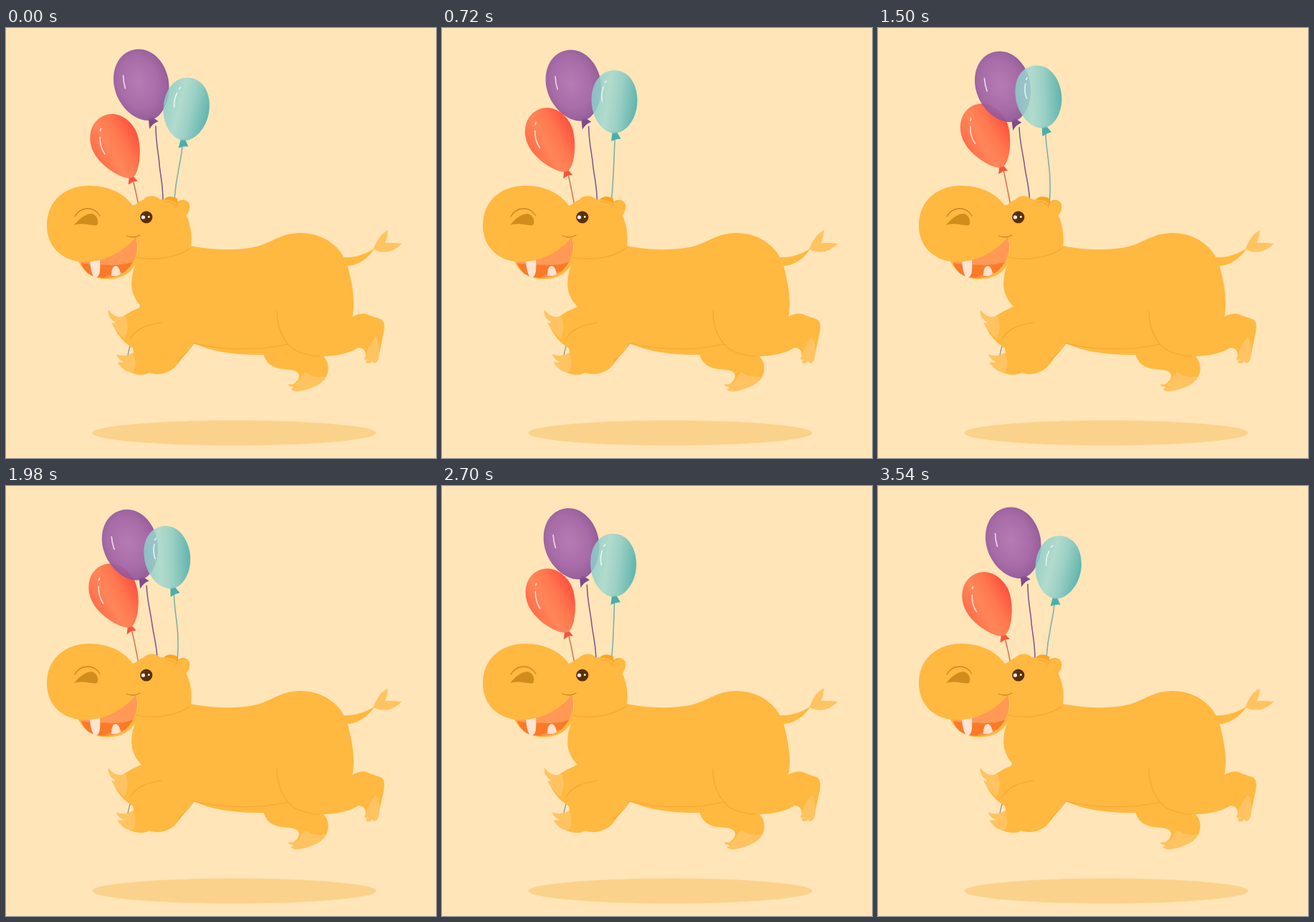
An HTML page that plays this animation: 600 px wide and 600 px high, repeating every 3.57 s.

```html
<!DOCTYPE html>
<html lang="en">
<head>
<meta charset="utf-8">
<title>Hippo with balloons</title>
<style>
  html, body { margin: 0; width: 100%; height: 100%; overflow: hidden; background: #ffe5b8; }
  svg { display: block; width: 100vw; height: 100vh; }
  .line { fill: none; stroke-linecap: round; stroke-linejoin: round; }
  .shade { stroke: #f5a630; stroke-width: 1.2; }
  .shine { stroke: #fff; stroke-opacity: .75; stroke-width: 1.6; }
  .body { fill: #ffb840; }
  .pale { fill: #ffc361; }
</style>
</head>
<body>
<svg viewBox="0 0 600 600">
  <defs>
    <radialGradient id="purple" cx=".46" cy=".46" r=".6">
      <stop offset="0" stop-color="#b071b3"/><stop offset=".6" stop-color="#a062a6"/><stop offset="1" stop-color="#864d92"/>
    </radialGradient>
    <linearGradient id="teal" x1="0" y1=".4" x2="1" y2=".6">
      <stop offset="0" stop-color="#87cdc9"/><stop offset=".35" stop-color="#a3d9d0"/>
      <stop offset=".6" stop-color="#8accc7"/><stop offset="1" stop-color="#41abab"/>
    </linearGradient>
    <linearGradient id="orange" x1="0" y1=".55" x2="1" y2=".45">
      <stop offset="0" stop-color="#ff6d4a"/><stop offset=".35" stop-color="#ff8659"/>
      <stop offset=".65" stop-color="#ff774f"/><stop offset="1" stop-color="#ff513f"/>
    </linearGradient>
    <clipPath id="mouth">
      <path d="M104 326C130 328 165 314 181 291C186 306 181 328 166 340C150 351 126 351 114 342Q107 335 104 326Z"/>
    </clipPath>
  </defs>

  <ellipse cx="318.500" cy="565" rx="198" ry="17.500" fill="#fbd28b"/>

  <path id="orangeString" class="line" stroke="#d8684a" stroke-width="1.400"/>
  <g id="orangeBalloon">
    <path fill="#f4573c" transform="rotate(8 0 46)" d="M-2 44H2L7 55Q0 53 -7 56Z"/>
    <path fill="url(#orange)" d="M0 -47C20 -47 33 -28 33 -8C33 14 13 48 1 48C-11 48 -33 16 -33 -8C-33 -28 -20 -47 0 -47Z"/>
    <path class="line shine" d="M-12 -30L-10 -32M-16 -22Q-22 -10 -20 2"/>
  </g>

  <g id="purpleBalloon">
    <path class="line" stroke="#7d5487" stroke-width="1.500" d="M209 137C209 160 213 176 214 190S219 218 219 240"/>
    <g transform="translate(189.500 79.500) rotate(-14)">
      <path fill="#804a8c" transform="rotate(-12 0 50)" d="M-2 48H4L9 57Q0 56 -7 61Z"/>
      <path fill="url(#purple)" fill-opacity=".92" d="M0 -50.500C23 -50.500 38 -28 38 -3C38 25 19 50.500 1 50.500C-18 50.500 -38 25 -38 -3C-38 -28 -23 -50.500 0 -50.500Z"/>
      <path class="line shine" d="M-22 -19Q-24 -10 -23.500 -1"/>
    </g>
  </g>

  <path id="tealString" class="line" stroke="#7cada2" stroke-width="1.500"/>
  <g id="tealBalloon">
    <path fill="#4caeac" transform="rotate(-10 0 44)" d="M-3 42H3L7 53Q0 52 -7 54Z"/>
    <path fill="url(#teal)" fill-opacity=".85" d="M0 -44C20 -44 32 -25 32 -2C32 23 16 44 0 44C-16 44 -32 23 -32 -2C-32 -25 -20 -44 0 -44Z"/>
    <path class="line shine" d="M-11 -29L-13 -27M-15 -21Q-19 -11 -17 -1"/>
  </g>

  <path id="gapString" class="line" stroke="#7cada2" stroke-width="1.300" d="M190 384L187 390"/>
  <path class="line" stroke="#8d8d80" stroke-width="1.200" d="M178 432Q172 444 170 457"/>

  <!-- tail -->
  <path class="body" d="M470 320C490 321 503 314 514 308C505 322 490 333 472 332Z"/>
  <path class="pale" d="M512 310C517 297 522 288 533 282Q532 292 529 300Q540 299 552 301C542 312 527 316 513 309Z"/>

  <!-- far legs and ear -->
  <path class="body" d="M478 406C488 400 494 397 503 399C511 403 518 404 524 407C529 411 528 418 527 425L520 458L501 460C504 452 499 446 492 446C482 452 466 458 440 458Z"/>
  <path class="pale" d="M516 431C523 439 521 455 520 461C517 469 513 469 511 465C507 470 502 468 502 465L506 462Q501 465 500 461C505 457 501 448 516 431Z"/>
  <path class="body" d="M350 440L359 454C362 466 370 475 388 476C400 477 409 478 409 486C408 493 403 495 398 500C410 508 432 503 444 491C454 478 450 461 438 454L400 440Z"/>
  <path class="pale" d="M418 480C428 488 438 487 447 486C442 496 428 503 413 506C405 508 398 507 398 503Q403 503 405 500Q394 502 394 497C402 498 410 495 411 487Z"/>
  <path fill="#f9a423" d="M218 243C221 235 231 233 239 238L241 254H222Z"/>
  <path class="body" d="M235 252C238 238 252 236 256 246Q258 256 248 265Z"/>

  <!-- body -->
  <path class="body" d="M240 300L258 304C291 311 334 311 356 303C376 296 386 286 412 286C451 287 473 313 478 337C485 365 487 385 483 406C477 433 468 458 440 458C420 458 405 454 396 448C380 455 365 456 350 456C318 456 286 451 262 440C252 449 246 462 237 472C226 483 211 485 200 481C190 486 179 484 168 478L178 452Q178 446 172 443C163 438 154 426 149 413L164 402Q176 394 189 389C171 370 173 350 181 328V316Z"/>
  <path class="pale" d="M143 393C149 402 157 405 167 402C171 412 171 424 165 433C157 426 150 418 147 411Q151 413 153 411Q141 404 143 393Z"/>
  <path class="pale" d="M154 455C162 459 171 457 177 453C182 464 182 473 177 480C169 481 164 477 159 471Q156 469 156 466Q161 467 164 466Q155 461 154 455Z"/>
  <path class="line shade" d="M217 411C199 414 181 419 174 433M378 395C378 422 390 440 402 449M402 449Q420 458 438 458M262 440C292 448 347 452 394 441M262 440Q252 454 240 465"/>

  <!-- mouth -->
  <path class="body" d="M101 326C111 345 127 352 148 350C169 348 181 335 184 319L182 290Z"/>
  <g clip-path="url(#mouth)">
    <path fill="#ff9955" d="M95 285H195V355H95Z"/>
    <path fill="#fa7a28" d="M104 328C120 331 135 330 148 331C158 330 168 331 179 325L164 355H106Z"/>
    <path fill="#ff9048" d="M133 352Q144 340 170 340L160 354Z"/>
    <path fill="#ffe0cc" d="M147 346C147 337 149 332 153 332C157 332 160 339 160 346Z"/>
  </g>
  <path fill="#ffe4d2" d="M117 325L131 324C132 337 131 348 125 348C120 347 118 337 117 325Z"/>

  <!-- head -->
  <path class="body" d="M57 275C57 242 82 220 116 220C144 220 165 231 177 248C184 245 187 241 191 240C196 234 207 232 215 239C224 240 234 239 240 246L251 260C258 274 260 290 258 306C238 321 208 325 183 320C184 309 184 299 181 291C165 313 134 329 102 326C75 322 57 303 57 275Z"/>
  <path class="line shade" d="M182 320C208 325 238 321 257 307M222 242Q232 242 236 248M237 250Q239 241 246 241"/>
  <path class="line" stroke="#cd8524" stroke-width="1.300" d="M168 290Q178 294 187 289M96 263C104 249 122 248 131 262"/>
  <path fill="#d18d1c" d="M95 275C103 265 112 259 120 259C128 262 130 270 127 275C122 277 108 271 95 275Z"/>
  <circle cx="195.800" cy="264" r="8.600" fill="#5b3006"/>
  <circle cx="191.500" cy="264" r="2.600" fill="#fff"/>
  <circle cx="199.300" cy="263.500" r="1.400" fill="#fff"/>
</svg>
<script>
  const LOOP = 3570, STEP = 30;
  const el = id => document.getElementById(id);
  const parts = Object.fromEntries(
    ['orangeString', 'orangeBalloon', 'purpleBalloon', 'tealString', 'tealBalloon', 'gapString'].map(id => [id, el(id)]));
  const set = (id, name, value) => parts[id].setAttribute(name, value);
  const mix = (a, b, p) => a + (b - a) * p;

  // Eased swing from 0 to 1 at the turn time, then back to 0 at the loop's end.
  const swing = (t, turn) => {
    const u = t < turn ? t / turn : (LOOP - t) / (LOOP - turn);
    return (1 - Math.cos(Math.PI * u)) / 2;
  };

  function draw(t) {
    const lift = swing(t, 1300);
    const ox = mix(155, 152.5, lift), oy = mix(165.5, 150.5, lift);
    set('orangeBalloon', 'transform', `translate(${ox} ${oy}) rotate(-25)`);
    set('orangeString', 'd', `M${ox + 23} ${oy + 50}Q${ox + 26} ${oy + 62} 185 248`);

    set('purpleBalloon', 'transform', `rotate(${-2.85 * swing(t, 1850)} 243 401)`);

    const sway = swing(t, 1680);
    const x = mix(251.5, 223.5, sway);
    const y = 105.3 + 9.3 * Math.cos(2 * Math.PI * (t + 320) / LOOP);
    const tilt = mix(6, -11, sway), a = tilt * Math.PI / 180;
    const kx = x - 53 * Math.sin(a), ky = y + 53 * Math.cos(a);
    set('tealBalloon', 'transform', `translate(${x} ${y}) rotate(${tilt})`);
    set('tealString', 'd',
      `M${kx} ${ky}C${mix(kx - 3, kx + 1, sway)} ${ky + 28} ${mix(238, 243, sway)} 200 ${mix(234.5, 239.5, sway)} 243`);
    set('gapString', 'opacity', Math.max(0, 1 - 2 * sway));
  }

  const start = performance.now();
  function tick() {
    const t = (performance.now() - start) % LOOP;
    draw(Math.floor(t / STEP) * STEP);
    requestAnimationFrame(tick);
  }
  tick();
</script>
</body>
</html>
```
